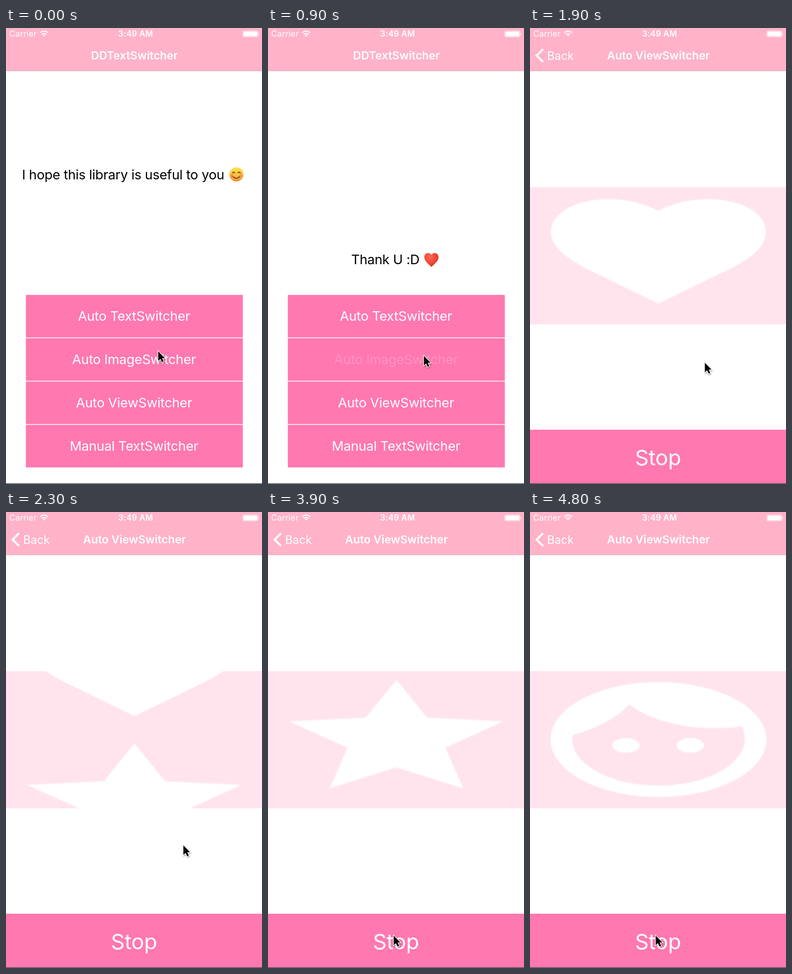
An HTML page for the animation above (5.1 s loop, 560x1000 px).

```html
<!DOCTYPE html>
<html lang="en">
<head>
<meta charset="utf-8">
<title>DDTextSwitcher</title>
<style>
  html, body { margin: 0; width: 100%; height: 100%; overflow: hidden; background: #fff; }
  svg { display: block; width: 100%; height: 100%; }
  text { font-family: Inter, Roboto, sans-serif; fill: #fff; }
  .mid { text-anchor: middle; }
  .label { font-size: 29px; letter-spacing: -.3px; }
  .dark { fill: #000; }
  .title { font-size: 24.4px; font-weight: 600; }
  .status { font-size: 18px; letter-spacing: .2px; }
</style>
</head>
<body>
<svg viewBox="0 0 560 1000">
  <defs>
    <clipPath id="textClip"><rect y="94" width="560" height="491"/></clipPath>
    <clipPath id="viewClip"><rect y="349" width="560" height="301"/></clipPath>
    <filter id="soft"><feGaussianBlur stdDeviation="1.3"/></filter>
    <filter id="shade" x="-50%" y="-50%" width="200%" height="200%">
      <feDropShadow dx="1" dy="2" stdDeviation="1.5" flood-opacity=".4"/>
    </filter>
    <linearGradient id="gold" x2="0" y2="1">
      <stop stop-color="#ffe045"/><stop offset=".55" stop-color="#fdc446"/><stop offset="1" stop-color="#ee8a2e"/>
    </linearGradient>
    <radialGradient id="red" cx=".4" cy=".3" r=".8">
      <stop stop-color="#ff6a50"/><stop offset="1" stop-color="#de2a22"/>
    </radialGradient>
    <linearGradient id="edge">
      <stop stop-color="#000" stop-opacity="0"/><stop offset="1" stop-color="#000" stop-opacity=".12"/>
    </linearGradient>
  </defs>

  <g id="home">
    <rect width="560" height="1000" fill="#fff"/>
    <g clip-path="url(#textClip)">
      <g id="lines">
        <text class="label dark" x="35" y="331.5">I hope this library is useful to you</text>
        <g transform="translate(504 321)" fill="none" stroke="#75401a" stroke-width="2" stroke-linecap="round">
          <circle r="15.5" fill="url(#gold)" stroke="none"/>
          <g fill="#f47d45" stroke="none" opacity=".6"><circle cx="-10" cy="3" r="4"/><circle cx="10" cy="3" r="4"/></g>
          <path d="M-8.500-3q2.500-4 5 0M3.500-3q2.500-4 5 0M-7 5q7 7 14 0"/>
        </g>
        <g transform="translate(0 491)">
          <text class="label dark" x="182" y="331.5">Thank U :D</text>
          <path transform="translate(357.500 321)" fill="url(#red)"
            d="M0-10C-3-17-15-16-15.500-6C-16 3-6 10 0 16C6 10 16 3 15.500-6C15-16 3-17 0-10Z"/>
        </g>
      </g>
    </g>
    <g id="buttons"></g>
    <rect id="dim" width="560" height="1000"/>
  </g>

  <g id="detail">
    <rect x="-10" y="94" width="10" height="906" fill="url(#edge)"/>
    <rect width="560" height="1000" fill="#fff"/>
    <rect y="349" width="560" height="301" fill="#ffe4ee"/>
    <g clip-path="url(#viewClip)">
      <g id="views" fill="#fff">
        <path filter="url(#soft)" d="M281 412C250 395 212 386 172 386C100 386 46 417 46 457C46 500 100 528 160 556L281 615L402 556C462 528 516 500 516 457C516 417 462 386 390 386C350 386 312 395 281 412Z"/>
        <path filter="url(#soft)" transform="translate(0 301)" d="M281 374L348 457L515 465L388 523L427 612L281 566L135 612L174 523L46 465L214 457Z"/>
        <g filter="url(#soft)" transform="translate(0 602)">
          <ellipse cx="281" cy="499" rx="236" ry="126"/>
          <path fill="#ffe4ee" d="M93 489Q175 467 217 422C265 458 350 484 464 470Q470 483 470 497C470 555 385 600 281 600C178 600 92 555 92 497Z"/>
          <ellipse cx="210" cy="512" rx="30" ry="16"/><ellipse cx="351" cy="512" rx="30" ry="16"/>
        </g>
      </g>
    </g>
    <rect y="881" width="560" height="119" fill="#ff78af"/>
    <text class="mid" x="280" y="959" font-size="47" letter-spacing="-.3">Stop</text>
  </g>

  <rect width="560" height="94" fill="#ffb2c8"/>
  <rect y="93.500" width="560" height="1" fill="#dda5b5"/>
  <text class="status" x="7" y="19">Carrier</text>
  <g fill="none" stroke="#fff" stroke-width="2.300">
    <path d="M75 10.500a12 12 0 0 1 17 0M78 14a8 8 0 0 1 11 0"/>
    <path fill="#fff" stroke="none" d="M83.500 19l-3-3.200a4.500 4.500 0 0 1 6 0Z"/>
  </g>
  <text class="status mid" x="283.500" y="19" font-weight="600">3:49 AM</text>
  <rect x="518" y="6.500" width="33" height="13" rx="2.500" fill="none" stroke="#fff"/>
  <rect x="519.500" y="8" width="30" height="10" rx="1" fill="#fff"/>
  <path d="M552.500 10.500q2.500 2.500 0 5Z" fill="#fff"/>
  <text id="homeTitle" class="title mid" x="281" y="69">DDTextSwitcher</text>
  <text id="detailTitle" class="title mid" x="281" y="69">Auto ViewSwitcher</text>
  <g id="back">
    <path d="M28.500 46.500L14.500 60.500L28.500 74.500" fill="none" stroke="#fff" stroke-width="4.500"/>
    <text x="37.500" y="69.500" font-size="25">Back</text>
  </g>
  <rect y="998.500" width="560" height="1.500" fill="#555"/>
  <g id="cursor" filter="url(#shade)">
    <path d="M0 0V21L4.800 16.600L8.300 24L11.800 22.500L8.600 15H14.500Z" stroke="#fff" stroke-width="2.400" paint-order="stroke"/>
  </g>
</svg>
<script>
const LOOP = 5100, STEP = 100;
const $ = id => document.getElementById(id);
const clamp = v => Math.min(1, Math.max(0, v));
const move = (id, x, y) => $(id).setAttribute('transform', `translate(${x} ${y})`);
const fade = (id, alpha) => $(id).setAttribute('opacity', alpha);

$('buttons').innerHTML = ['Auto TextSwitcher', 'Auto ImageSwitcher', 'Auto ViewSwitcher', 'Manual TextSwitcher']
  .map((name, i) => `<g transform="translate(0 ${585.3 + 95 * i})">
    <rect x="43.500" width="474.500" height="93.300" fill="#ff78af"/>
    <text id="button${i}" class="label mid" x="280" y="57">${name}</text></g>`).join('');

// Ease-in-out, cubic-bezier(.42, 0, .58, 1), lasting one second
function ease(t, start) {
  const u = clamp((t - start) / 1000);
  let lo = 0, hi = 1;
  for (let i = 0; i < 20; i++) {
    const s = (lo + hi) / 2, r = 1 - s;
    if (1.26 * s * r * r + 1.74 * s * s * r + s * s * s < u) lo = s; else hi = s;
  }
  return lo * lo * (3 - 2 * lo);
}

// Share of the page push still to go: a critically damped spring
function pushLeft(t) {
  const x = Math.max(0, t - 905) * .026;
  return (1 + x) * Math.exp(-x);
}

// Pointer stops: time, x, y
const track = [
  [0, 333, 709], [400, 341, 719], [1500, 341, 719], [1600, 377, 737], [1800, 377, 737],
  [2000, 388, 731], [3000, 388, 731], [3100, 374.5, 738], [3200, 350, 790], [3300, 308, 885],
  [3400, 276, 952], [3500, 271, 962], [3600, 275, 929], [LOOP, 275, 929]
];
function pointer(t) {
  const i = track.findIndex(stop => stop[0] > t);
  const [t0, x0, y0] = track[i - 1], [t1, x1, y1] = track[i];
  const k = (t - t0) / (t1 - t0);
  return [x0 + (x1 - x0) * k, y0 + (y1 - y0) * k];
}

function draw(t) {
  const left = pushLeft(t), done = 1 - left;
  move('lines', 0, -491 * ease(t, 330));
  move('home', -168 * done, 0);
  fade('dim', .1 * done);
  fade('button1', t >= 800 && t <= 1000 ? .2 : 1);
  move('detail', left > .999 ? 580 : 560 * left, 0);
  move('views', 0, -301 * (ease(t, 1767) + ease(t, 3799)));
  move('homeTitle', -200 * done, 0);
  fade('homeTitle', clamp(1 - 1.6 * done));
  move('detailTitle', 260 * left, 0);
  fade('detailTitle', done);
  fade('back', done);
  move('cursor', ...pointer(t));
}

function tick() {
  const t = performance.now() % LOOP;
  draw(Math.min(4800, Math.floor(t / STEP) * STEP));
  requestAnimationFrame(tick);
}
tick();
</script>
</body>
</html>
```
